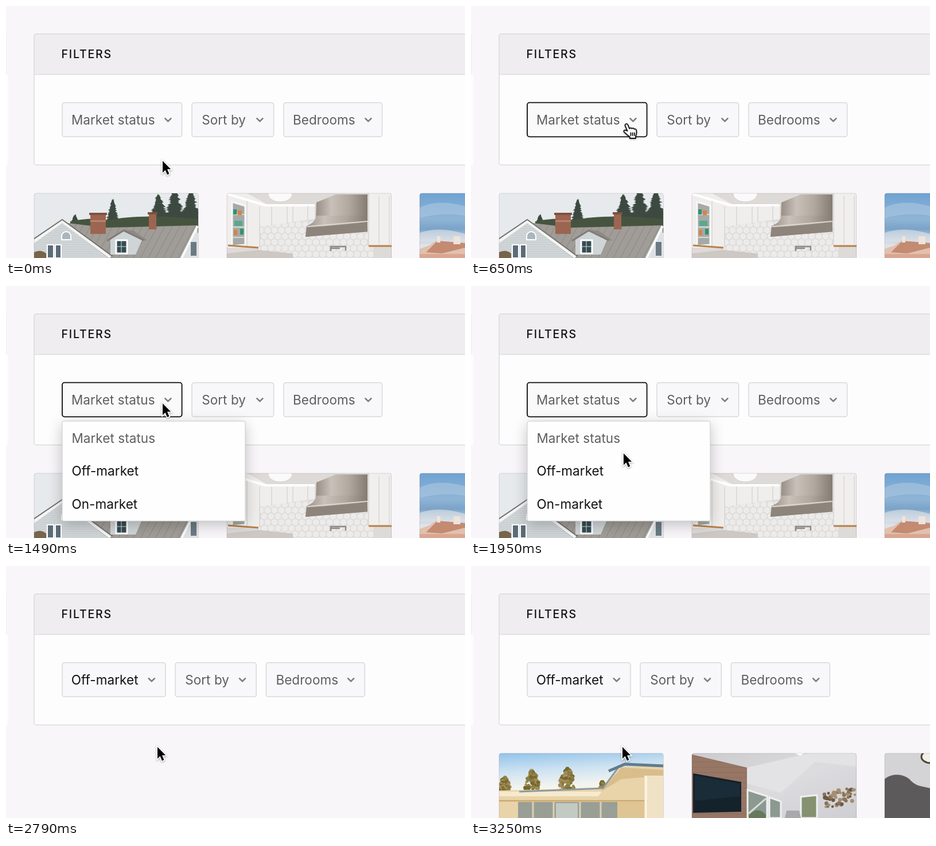
Write an HTML page that moves like this. It is 800 px wide and 440 px high and loops after 3340 ms.

```html
<!DOCTYPE html>
<html lang="en">
<head>
<meta charset="utf-8">
<title>Filters</title>
<style>
  html, body { margin: 0; width: 100%; height: 100%; overflow: hidden; background: #f8f6f9; }
  svg { display: block; }
  text { font: 400 22.5px Inter, sans-serif; letter-spacing: .06px; fill: #5e5e60; }
  text.dark { fill: #111; }
  text.title { font-size: 19.6px; font-weight: 500; letter-spacing: .09em; fill: #111; }
  .button rect { fill: #f8f7f9; stroke: #d9d8da; stroke-width: 1.5; }
  .button.focus rect { stroke: #0c0c0c; stroke-width: 1.8; fill: #fafafb; }
  .chevron { fill: none; stroke: #7d7c7f; stroke-width: 2.7; stroke-linecap: round; stroke-linejoin: round; }
  #menu { transform-origin: 257.5px 236px; }
  #menu .sheet { fill: #fefefe; stroke: #c9c8ca; filter: drop-shadow(0 6px 12px rgba(0, 0, 0, .22)); }
  #cursor { filter: drop-shadow(0 1.5px 1.5px rgba(0, 0, 0, .35)); }
  .frame { fill: none; stroke: #000; stroke-opacity: .13; }
</style>
</head>
<body>
<svg width="800" height="440" viewBox="0 0 800 440">
  <defs>
    <clipPath id="cards">
      <rect x="49" y="327" width="286" height="150" rx="4"/>
      <rect x="385" y="327" width="287" height="150" rx="4"/>
      <rect x="721" y="327" width="287" height="150" rx="4"/>
    </clipPath>
    <linearGradient id="steel">
      <stop stop-color="#968d85"/><stop offset=".3" stop-color="#c9c1b9"/>
      <stop offset=".65" stop-color="#b0a79e"/><stop offset="1" stop-color="#857b73"/>
    </linearGradient>
    <linearGradient id="dusk" x2="0" y2="1">
      <stop stop-color="#6fa3d3"/><stop offset=".4" stop-color="#8fb4d5"/>
      <stop offset=".55" stop-color="#7ba3c8"/><stop offset=".8" stop-color="#dfe3e9"/>
    </linearGradient>
    <linearGradient id="day" x2=".15" y2="1">
      <stop stop-color="#93c3ea"/><stop offset=".3" stop-color="#cfe3f2"/><stop offset=".55" stop-color="#f4f4ef"/>
    </linearGradient>
    <linearGradient id="room" x2="1" y2="1">
      <stop stop-color="#cbcbce"/><stop offset=".5" stop-color="#dcdcdf"/><stop offset="1" stop-color="#cfcfd3"/>
    </linearGradient>
    <pattern id="seams" width="13" height="12" patternUnits="userSpaceOnUse" patternTransform="skewX(-28)">
      <path d="M0 0V12" stroke="#807b77" stroke-width="1.4"/>
    </pattern>
    <pattern id="siding" width="5" height="4" patternUnits="userSpaceOnUse">
      <path d="M0 0H5" stroke="#bcc1c4"/>
    </pattern>
    <pattern id="planks" width="96" height="9" patternUnits="userSpaceOnUse">
      <path d="M0 0H96" stroke="#866654"/>
    </pattern>
    <pattern id="hex" width="12" height="20.8" patternUnits="userSpaceOnUse">
      <path d="M0 3.5L6 0L12 3.5V10.4L6 13.9L0 10.4ZM6 13.9V20.8" fill="none" stroke="#d2d0cf"/>
    </pattern>
  </defs>

  <rect width="800" height="440" fill="#f8f6f9"/>
  <path d="M0 50H1V120H0Z" fill="#efedef"/>
  <path d="M0 120H4V278H0Z" fill="#fefdfe"/>

  <rect x="49" y="48.7" width="900" height="228.8" rx="4" fill="#fefdfe"/>
  <path d="M49 119.5V52.7Q49 48.7 53 48.7H800V119.5Z" fill="#efedef"/>
  <path d="M49 119.5H800" stroke="#dddcde" stroke-width="1.4"/>
  <rect x="49" y="48.7" width="900" height="228.8" rx="4" fill="none" stroke="#dbdadc" stroke-width="1.5"/>
  <text class="title" x="96.5" y="91.3">FILTERS</text>

  <g id="before"></g>
  <g id="after"></g>

  <g id="homes" clip-path="url(#cards)">
    <!-- shingled house -->
    <path d="M49 327H335V440H49Z" fill="#e6eaec"/>
    <g id="greens" fill="#3c4a41"></g>
    <path d="M112 376Q150 368 180 374Q230 362 335 372V396H112Z" fill="#46543f"/>
    <path d="M100 378L174 387L333 383L306 440H150Z" fill="#a09c97"/>
    <path d="M100 378L174 387L333 383L306 440H150Z" fill="url(#seams)"/>
    <path d="M147 362H174V398H147ZM249 362H262V390H249Z" fill="#9c6551"/>
    <path d="M145 361H176V365H145ZM247 360H264V364H247Z" fill="#80503f"/>
    <path d="M147 374H174V377H147Z" fill="#b5846f"/>
    <path d="M97 378L49 412V440H178Z" fill="#d0d5d8"/>
    <path d="M97 378L49 412V440H178Z" fill="url(#siding)"/>
    <path d="M46 413L98 376L182 439" fill="none" stroke="#f4f5f5" stroke-width="5"/>
    <path d="M45 409L98 373L186 437" fill="none" stroke="#77736f" stroke-width="2"/>
    <path d="M97 408V402A8 8 0 0 1 113 402V408Z" fill="#aab6be" stroke="#fff" stroke-width="2"/>
    <path d="M72 417H83V440H72ZM86 417H96V440H86Z" fill="#5b6c77" stroke="#fff" stroke-width="2"/>
    <path d="M49 430Q60 424 70 432V440H49Z" fill="#77644a"/>
    <path d="M182 408L205 393L238 407L226 434H182Z" fill="#cfd4d7"/>
    <path d="M205 391L222 392L246 409L238 410Z" fill="#8e8985"/>
    <path d="M176 410L205 392L240 409" fill="none" stroke="#807b77" stroke-width="3"/>
    <path d="M192 409H211V432H192Z" fill="#344b52" stroke="#fff" stroke-width="3"/>
    <path d="M201 409V432M192 420H211" stroke="#d8dfe0"/>
    <path d="M334 384L304 440H335Z" fill="#dfe2e4"/>
    <path d="M334 384L306 440" stroke="#fafafa" stroke-width="4"/>
    <path d="M322 412H332V436H322Z" fill="#6a7a83"/>

    <!-- kitchen -->
    <path d="M385 327H672V440H385Z" fill="#dddad8"/>
    <path d="M440 376H640V440H440Z" fill="#ecebea"/>
    <path d="M440 376H640V440H440Z" fill="url(#hex)"/>
    <path d="M385 327H420L455 346H538V372L442 385V422H385Z" fill="#efeeed"/>
    <path d="M385 328L452 348H538" fill="none" stroke="#fff" stroke-width="4"/>
    <path d="M420 340V421M442 350V421M463 350V384M490 350V380M500 350V378M526 349V374" stroke="#cdcac8"/>
    <path d="M394 342L417 349V417L394 419Z" fill="#a5aaa8" stroke="#f7f7f6" stroke-width="3"/>
    <path d="M396 364H416M396 386H416M396 404H416" stroke="#d8dad8" stroke-width="2"/>
    <path d="M396 355h6v9h-6ZM408 389h6v10h-6Z" fill="#2f9270"/>
    <path d="M404 357h7v8h-7ZM397 391h6v9h-6Z" fill="#d98343"/>
    <path d="M398 375h14v9h-14Z" fill="#5aa88d"/>
    <path d="M387 418L440 422" stroke="#b98145" stroke-width="3"/>
    <ellipse cx="478" cy="328" rx="21" ry="14" fill="#fafafa" stroke="#d2d0ce"/>
    <path d="M541 343L575 329H630V376H540Z" fill="url(#steel)"/>
    <path d="M541 366C540 375 533 380 524 384L522 403L630 394V366Z" fill="url(#steel)"/>
    <path d="M524 387L630 378V394L522 403Z" fill="#8d847c"/>
    <path d="M525 385L630 376" stroke="#ddd6cf" stroke-width="2"/>
    <path d="M632 327H672V418H632Z" fill="#f0efee"/>
    <path d="M632 327V418M650 332V416M668 332V416" stroke="#cdcac8"/>
    <path d="M632 419H672" stroke="#b98145" stroke-width="3"/>
    <path d="M566 428V420H592V427M566 423H582" fill="none" stroke="#8c8987" stroke-width="2.5"/>
    <path d="M385 440V432L440 426L500 432V440Z" fill="#cdc8c4"/>

    <!-- terracotta roofs -->
    <path d="M721 327H800V440H721Z" fill="url(#dusk)"/>
    <path d="M721 352Q752 336 800 350V366Q760 360 721 370Z" fill="#a6c3de" opacity=".7"/>
    <path d="M721 396Q756 384 800 398V412H721Z" fill="#e5e6ea" opacity=".6"/>
    <path d="M721 424L738 418L750 410L800 414V440H721Z" fill="#e2c0ae"/>
    <path d="M732 430L752 410L800 414V422L760 432Z" fill="#c48a72"/>
    <path d="M751 402h6v11h-6ZM780 402h12v14h-12Z" fill="#efe3da"/>
    <path d="M721 433H800V440H721Z" fill="#d9a791"/>
  </g>

  <g id="results" clip-path="url(#cards)">
    <!-- flat-roofed house -->
    <path d="M49 327H335V440H49Z" fill="url(#day)"/>
    <g id="autumn"></g>
    <path d="M49 392L230 388L262 350H335V440H49Z" fill="#e9d3a9"/>
    <path d="M49 394H228L222 402H49Z" fill="#f6e9cd"/>
    <path d="M226 394L262 352L335 356V366L262 372Z" fill="#d9bd8b"/>
    <path d="M84 394L230 388L256 353" fill="none" stroke="#8d9b9c" stroke-width="3"/>
    <path d="M240 358L268 346L335 349" fill="none" stroke="#5f7c8e" stroke-width="5"/>
    <path d="M49 410H320" stroke="#cba86f" stroke-width="2.5"/>
    <path d="M82 412H255V440H82Z" fill="#9a9f95"/>
    <path d="M108 412V440M144 412V440M190 412V440M226 412V440" stroke="#dccfb3" stroke-width="3"/>
    <path d="M148 414H186V440H148Z" fill="#c3c9c3"/>
    <path d="M255 412H335V440H255Z" fill="#dfc494"/>
    <path d="M308 366H335V440H308Z" fill="#f0e2c4"/>
    <path d="M305 366V440" stroke="#fbf3e1" stroke-width="5"/>

    <!-- living room -->
    <path d="M385 327H672V440H385Z" fill="url(#room)"/>
    <path d="M481 352L590 327H672V350L600 342L540 396L481 380Z" fill="#e3e3e6"/>
    <path d="M385 329L481 352V440H385Z" fill="#977665"/>
    <path d="M385 329L481 352V440H385Z" fill="url(#planks)"/>
    <path d="M387 362L471 377V429L387 431Z" fill="#14222c"/>
    <path d="M390 366L468 380V402L390 410Z" fill="#1a2c37"/>
    <path d="M482 391L516 402V440H482ZM520 404L540 411V440H520Z" fill="#8b9990" stroke="#f0f0f1" stroke-width="3"/>
    <path d="M484 432L514 406" stroke="#d8dad8" stroke-width="3"/>
    <path d="M484 436Q498 418 514 434V440H484Z" fill="#66795a"/>
    <path d="M575 403L603 400V440H575Z" fill="#85916f" stroke="#f0f0f1" stroke-width="3"/>
    <path d="M550 427H572L575 440H547Z" fill="#a9a9ab"/>
    <g id="leaves"></g>
    <path d="M564 327H580L574 331Z" fill="#fff"/>

    <!-- mural -->
    <path d="M721 327H800V440H721Z" fill="#d4d4d6"/>
    <path d="M721 372C732 362 752 362 764 372C776 386 786 384 800 388V440H721Z" fill="#5c5a5b"/>
    <ellipse cx="801" cy="333" rx="16" ry="11" fill="#f2efe9" stroke="#4d443c" stroke-width="3"/>
  </g>

  <g id="frames"></g>

  <g id="menu">
    <rect class="sheet" x="98" y="236" width="319" height="174.3" rx="2.5"/>
    <path id="hover" d="M98.5 294.3H416.5V352H98.5Z" fill="#e0dfdc"/>
    <text x="114.4" y="273.8">Market status</text>
    <text class="dark" x="114.4" y="331.4">Off-market</text>
    <text class="dark" x="114.4" y="389">On-market</text>
  </g>

  <g id="cursor">
    <path id="arrow" d="M0 0V20.4L4.6 16L8 24L11.4 22.6L8 14.6H14.3Z" fill="#000" stroke="#fff" stroke-width="3.2" paint-order="stroke"/>
    <g id="hand" stroke="#111" stroke-width="1.8" stroke-linecap="round" stroke-linejoin="round">
      <path fill="#fff" d="M-.4 13.4L-4.2 4.4C-5.4 1.2 -1.2 -.8 .2 2.2L3.2 9.2C4 7.4 6.6 7.4 7.4 9.2C8.8 7.8 10.8 8.4 11.4 10C13 9.2 14.8 10 15.2 12C15.9 16 15.6 19 14 22V26H3.8V23.6C.8 21.4 -2.4 18.6 -5.8 15.4C-8.4 12.6 -4.6 10 -.4 13.4Z"/>
      <path d="M5.4 16.5V21M8.6 16.5V21M11.8 16.5V21"/>
    </g>
  </g>
</svg>
<script>
const LOOP = 3340, TICK = 92.8;
const $ = id => document.getElementById(id);

const button = (label, x, right, textX, cls = '') => `<g class="button">
  <rect x="${x}" y="168.7" width="${right - x}" height="59.6" rx="4"/>
  <text class="${cls}" x="${textX}" y="206.6">${label}</text>
  <path class="chevron" d="M${right - 29.2} 196.4l5 5l5 -5"/></g>`;

$('before').innerHTML = button('Market status', 98, 306.6, 113.9) +
  button('Sort by', 324, 466.6, 341.2) + button('Bedrooms', 484, 655.6, 500);
$('after').innerHTML = button('Off-market', 98, 278, 113.8, 'dark') +
  button('Sort by', 295, 436.2, 312.2) + button('Bedrooms', 453.4, 625.4, 470.4);
$('frames').innerHTML = [49, 385, 721].map(x =>
  `<rect class="frame" x="${x}" y="327" width="286.5" height="150" rx="4"/>`).join('');

let seed = 7;
const random = () => (seed = seed * 16807 % 2147483647) / 2147483647;
const pick = list => list[Math.floor(random() * list.length)];
const dots = (count, dot) => Array.from({ length: count }, (_, i) => dot(i / (count - 1))).join('');

// Ragged tree of short drooping boughs
const fir = (x, top, width, height) => dots(60, p => {
  const w = width / 2 * (.15 + .85 * p) * (.5 + random() * .6);
  const y = top + height * p, cx = x + (random() - .5) * 3;
  return `<path d="M${cx - w} ${y + 3}L${cx} ${y - 2}L${cx + w} ${y + 3}L${cx} ${y + 5}Z"/>`;
});
$('greens').innerHTML = fir(186, 338, 26, 38) + fir(120, 365, 18, 16) +
  fir(266, 330, 50, 56) + fir(294, 324, 62, 62) + fir(322, 324, 60, 62);

// Round crown made of leaf clumps
const crown = (x, top, width, height) => dots(60, p => {
  const y = top + 3 + (height - 3) * p, w = width / 2 * Math.sqrt(p);
  return `<circle cx="${x + (random() * 2 - 1) * w}" cy="${y}" r="${2 + random() * 2}" fill="${pick(['#8c7b42', '#75682f', '#a18c56'])}"/>`;
});
$('autumn').innerHTML = crown(59, 366, 20, 26) + crown(107, 354, 28, 38) + crown(168, 351, 32, 40) + crown(229, 374, 8, 14);

$('leaves').innerHTML = dots(46, p => {
  const x = 616 + 53 * p, y = 411 - 13 * p + (random() - .5) * 26;
  return `<circle cx="${x}" cy="${y}" r="${2 + random() * 2}" fill="${pick(['#8a7358', '#6b5845', '#a58f70'])}"/>`;
});

const ramp = (t, from, to) => Math.min(1, Math.max(0, (t - from) / (to - from)));
const ease = p => p * p * (3 - 2 * p);
const show = (id, on) => $(id).style.display = on ? '' : 'none';

// Times in ms
const FOCUS = 640, OPEN = 730, PICK = 2590;

function pose(t) {
  const rise = ease(ramp(t, 290, 640)), drop = ease(ramp(t, 1500, 2140));
  const x = 273 - 9 * drop, y = 270.5 - 65.5 * rise + 111 * drop;
  const picked = t >= PICK, open = t >= OPEN;
  const pointing = open ? !picked && y > 294 : y < 228;

  show('before', !picked);
  show('after', picked);
  $('before').firstElementChild.classList.toggle('focus', t >= FOCUS);

  // Grows past its size, then settles
  const scale = t < 790 ? .975 : 1 + .0065 * (1 - ramp(t, 840, 930));
  $('menu').style.transform = `scale(${scale})`;
  $('menu').style.opacity = ramp(t, 660, 830) * (1 - ramp(t, 2510, 2690) * picked);
  show('menu', open);
  show('hover', open && y > 294);

  const leaving = 1 - ramp(t, 2510, 2780) * picked, arriving = ramp(t, 2970, 3245);
  $('homes').style.opacity = leaving;
  $('results').style.opacity = arriving;
  $('frames').style.opacity = Math.max(leaving, arriving);

  $('cursor').setAttribute('transform', `translate(${x} ${y})`);
  show('hand', pointing);
  show('arrow', !pointing);
}

const start = performance.now();
let last = -1;
function draw() {
  const t = (performance.now() - start) % LOOP;
  const step = Math.min(35, Math.floor((t + 5) / TICK));
  if (step !== last) pose((last = step) * TICK);
  requestAnimationFrame(draw);
}
draw();
</script>
</body>
</html>
```
